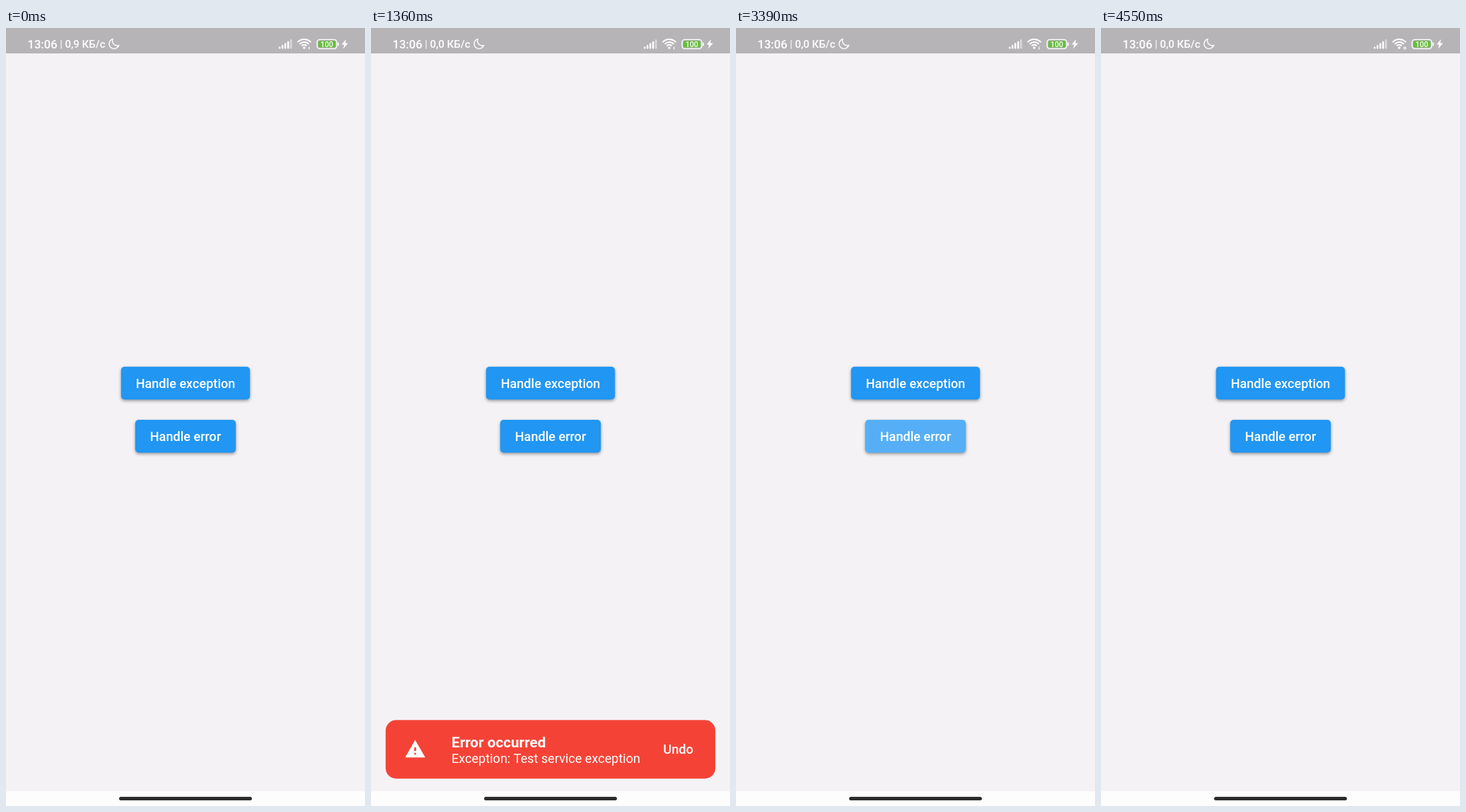
An HTML page with a canvas for the animation above (4940 ms loop, 508 px wide and 1102 px high).

```html
<!DOCTYPE html>
<html lang="en">
<head>
<meta charset="utf-8">
<title>Error handling demo</title>
<style>
  html, body { margin: 0; width: 100%; height: 100%; overflow: hidden; background: #f4f2f5; }
  canvas { display: block; }
</style>
</head>
<body>
<canvas id="stage" width="508" height="1102"></canvas>
<script>
const ctx = document.getElementById('stage').getContext('2d');
const LOOP = 4940;
const DP = 508 / 393;
const BODY = 14 * DP, TITLE = 16 * DP;
const NAV_TOP = 1081;
const WARNING = new Path2D('M1 21h22L12 2 1 21zm12-3h-2v-2h2v2zm0-4h-2v-4h2v4z');
const MOON = new Path2D('M151 15.6A7 7 0 1 0 159.6 24.6A6.9 6.9 0 0 1 151 15.6Z');
const BOLT = new Path2D('M481 16L475 23.6H478.6L477 29.5L484 21.4H480.2Z');

const ramp = (t, from, to) => Math.min(1, Math.max(0, (t - from) / (to - from)));
const smooth = p => p * p * (3 - 2 * p);
const mix = (a, b, p) => a + (b - a) * p;
const pulse = (t, a, b, c, d) => ramp(t, a, b) * (1 - ramp(t, c, d));

function text(str, x, y, size, weight = 400, align = 'left') {
  ctx.font = `${weight} ${size}px Roboto, sans-serif`;
  ctx.textAlign = align;
  ctx.fillText(str, x, y);
}

function roundRect(x, y, w, h, r) {
  ctx.beginPath();
  ctx.roundRect(x, y, w, h, r);
}

function drawWifi(twoTicks) {
  ctx.lineWidth = 2;
  for (const r of [4.8, 8.6, 12.6]) {
    ctx.beginPath();
    ctx.arc(422, 28.5, r, -Math.PI * 0.77, -Math.PI * 0.23);
    ctx.stroke();
  }
  ctx.beginPath();
  ctx.arc(422, 28, 1.8, 0, 7);
  ctx.fill();
  ctx.fillRect(428.2, 26.5, 1.3, 4);
  if (twoTicks) ctx.fillRect(430.5, 26.5, 1.3, 4);
}

function drawStatusBar(t) {
  ctx.fillStyle = '#b7b4b7';
  ctx.fillRect(0, 0, 508, 36);
  ctx.fillStyle = ctx.strokeStyle = '#fff';
  text('13:06', 30.5, 28.5, 16.6, 500);
  text('|', 76.3, 27.5, 14.5);
  text(t < 1130 ? '0,9 КБ/с' : '0,0 КБ/с', 83.5, 28, 15, 500);
  ctx.lineWidth = 1.4;
  ctx.stroke(MOON);

  for (let i = 0; i < 5; i++) {
    const h = 3 + i * 2.6;
    ctx.globalAlpha = i < 4 ? 1 : 0.5;
    roundRect(386 + i * 4, 29.5 - h, 2.5, h, 1);
    ctx.fill();
  }
  ctx.globalAlpha = 1;
  drawWifi(t >= 3880);

  ctx.lineWidth = 1.4;
  roundRect(440.2, 16.4, 27.8, 13, 3.8);
  ctx.stroke();
  ctx.fillStyle = '#66bd3c';
  roundRect(442, 18.2, 24.2, 9.4, 2);
  ctx.fill();
  ctx.fillStyle = '#fff';
  text('100', 454, 26.9, 10.5, 500, 'center');
  roundRect(469.3, 20.5, 1.6, 5, 0.8);
  ctx.fill();
  ctx.fill(BOLT);
}

function drawNavBar() {
  ctx.fillStyle = '#fefdfe';
  ctx.fillRect(0, NAV_TOP, 508, 1102 - NAV_TOP);
  ctx.fillStyle = '#2d2c2d';
  roundRect(160, 1089, 188, 5, 2.5);
  ctx.fill();
}

// press: lift 0..1, highlight and splash opacities, splash circle
function drawButton(label, x, y, w, press) {
  const h = 46.5;
  ctx.save();
  ctx.shadowColor = `rgba(0,0,0,${mix(0.38, 0.42, press.lift)})`;
  ctx.shadowBlur = mix(4, 13, press.lift);
  ctx.shadowOffsetY = mix(2, 7, press.lift);
  ctx.fillStyle = '#2196f3';
  roundRect(x, y, w, h, 5);
  ctx.fill();
  ctx.restore();

  ctx.save();
  ctx.clip();
  ctx.fillStyle = `rgba(255,255,255,${press.highlight})`;
  ctx.fillRect(x, y, w, h);
  ctx.fillStyle = `rgba(255,255,255,${press.splash})`;
  ctx.beginPath();
  ctx.arc(press.x, press.y, press.r, 0, 7);
  ctx.fill();
  ctx.restore();

  ctx.fillStyle = '#fff';
  text(label, 254, y + 29.7, BODY, 500, 'center');
}

function exceptionPress(t) {
  const grow = smooth(ramp(t, 850, 1000));
  return {
    lift: pulse(t, 710, 785, 970, 1170),
    highlight: 0.04 * pulse(t, 750, 785, 900, 1000),
    splash: t < 850 ? 0.117 * ramp(t, 750, 785)
                    : mix(0.117, 0.24, ramp(t, 850, 890)) * (1 - ramp(t, 1000, 1150)),
    x: mix(283, 254, grow), y: mix(513.5, 503, grow), r: mix(30, 102, grow)
  };
}

function errorPress(t) {
  const grow = smooth(ramp(t, 3150, 3385));
  return {
    lift: 0.3 * pulse(t, 3150, 3200, 3230, 3370),
    highlight: 0,
    splash: 0.24 * pulse(t, 3140, 3215, 3420, 3570),
    x: mix(264, 254, grow), y: mix(584, 578, grow), r: mix(23, 82, grow)
  };
}

function drawSnackbar(bar, t) {
  if (t < bar.enter[0] || t >= bar.leave[1]) return;
  ctx.save();
  ctx.beginPath();
  ctx.rect(0, 36, 508, NAV_TOP - 36);
  ctx.clip();
  ctx.globalAlpha = ramp(t, ...bar.enter);
  ctx.translate(0, (NAV_TOP - bar.top) * ramp(t, ...bar.leave));

  ctx.fillStyle = '#f44336';
  roundRect(20.7, bar.top, 466.6, 1063.2 - bar.top, 15);
  ctx.fill();

  ctx.fillStyle = '#fff';
  ctx.save();
  ctx.translate(bar.iconX, bar.iconY);
  ctx.scale(DP, DP);
  ctx.fill(WARNING);
  ctx.restore();

  text('Error occurred', bar.textX, bar.titleY, TITLE, 700);
  bar.lines.forEach((line, i) =>
    text(line, bar.textX, bar.titleY + 22 + i * 20.8, BODY));
  text('Undo', 413.6, bar.undoY, BODY, 500);
  ctx.restore();
}

const bars = [
  {
    enter: [1060, 1260], leave: [2440, 2610], top: 980.3,
    iconX: 47, iconY: 1006, textX: 114, titleY: 1018.7, undoY: 1028.2,
    lines: ['Exception: Test service exception']
  },
  {
    enter: [3410, 3610], leave: [4438, 4550], top: 976.5,
    iconX: 36.5, iconY: 1004.5, textX: 82.3, titleY: 1006.6, undoY: 1026.4,
    lines: ['Invalid argument(s): -6 is not positive', 'number']
  }
];

function draw(t) {
  ctx.fillStyle = '#f4f2f5';
  ctx.fillRect(0, 0, 508, 1102);
  drawButton('Handle exception', 162.8, 479.8, 182.4, exceptionPress(t));
  drawButton('Handle error', 182.8, 555, 142.4, errorPress(t));
  bars.forEach(bar => drawSnackbar(bar, t));
  drawStatusBar(t);
  drawNavBar();
}

const start = performance.now();
function tick() {
  draw((performance.now() - start) % LOOP);
  requestAnimationFrame(tick);
}
tick();
</script>
</body>
</html>
```
